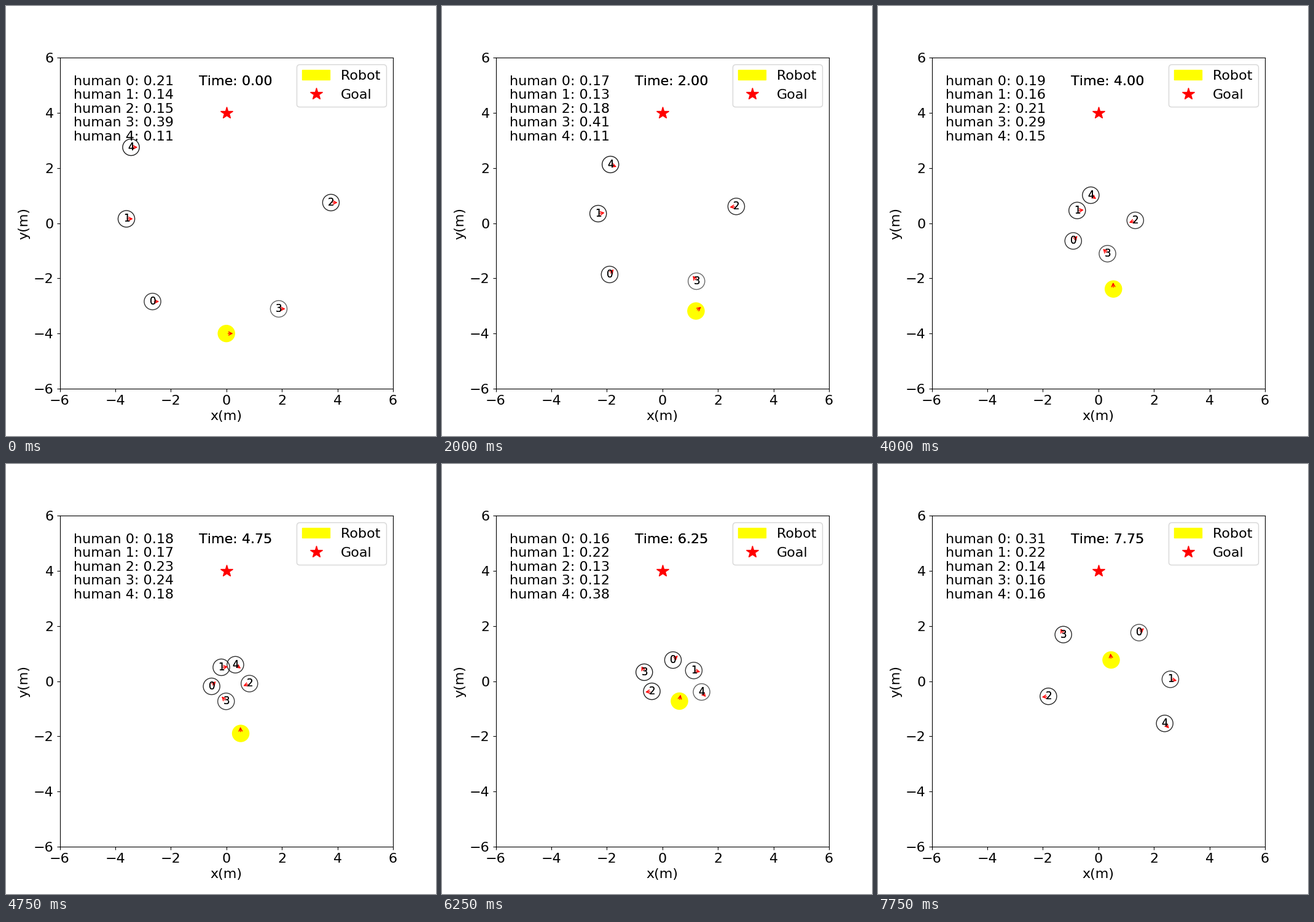
Animation of 700 by 700 pixels, one loop 8 s. Source, as a matplotlib script:

```python
import numpy as np
import matplotlib.pyplot as plt
from matplotlib.animation import FuncAnimation
from matplotlib.lines import Line2D
from matplotlib.patches import ArrowStyle, Circle, FancyArrowPatch

STEP = 0.25
FRAMES = 32
RADIUS = 0.3
LABEL_SHIFT = 0.11

# Everyone walks straight between a few turning points.
HUMAN_TIMES = [0, 2, 5.5, 7.75]
HUMAN_PATHS = [
    [(-2.66, -2.84), (-1.9, -1.86), (-0.16, 0.267), (1.465, 1.759)],
    [(-3.6, 0.156), (-2.313, 0.345), (0.4, 0.545), (2.593, 0.067)],
    [(3.765, 0.746), (2.66, 0.606), (0.33, -0.278), (-1.8, -0.55)],
    [(1.885, -3.106), (1.227, -2.104), (-0.348, -0.358), (-1.262, 1.688)],
    [(-3.434, 2.75), (-1.87, 2.126), (0.923, 0.178), (2.388, -1.532)],
]
ROBOT_TIMES = [0, 0.5, 0.75, 2, 3.75, 5.5, 6.25, 7.75]
ROBOT_PATH = [(0, -4), (0.02, -4.05), (0.25, -3.95), (1.21, -3.184),
              (0.55, -2.55), (0.49, -1.403), (0.614, -0.724), (0.459, 0.768)]


def walk(times, points):
    """Return a function of time that follows the points."""
    xs, ys = zip(*points)
    return lambda t: np.array([np.interp(t, times, xs), np.interp(t, times, ys)])


def attention(offsets):
    """Shares of the robot's attention: near people and those to its right count more."""
    dist = np.hypot(offsets[:, 0], offsets[:, 1])
    weight = np.exp(0.5 * offsets[:, 0] / dist ** 2) / (1 + dist)
    return weight / weight.sum()


def aim(arrow, path, t):
    """Point the arrow along the last step; at rest it points right."""
    pos = path(t)
    dx, dy = pos - path(t - STEP) if t > 0 else (1, 0)
    tip = pos + RADIUS * np.array([dx, dy]) / np.hypot(dx, dy)
    arrow.set_positions(tuple(pos), tuple(tip))


def bold_text(x, y, text, size):
    """Text drawn twice, which darkens its soft edges."""
    return [ax.text(x, y, text, fontsize=size, color="black") for _ in range(2)]


plt.rcParams["font.family"] = "DejaVu Sans"
plt.rcParams["text.kerning_factor"] = 6
fig, ax = plt.subplots(figsize=(7, 7), dpi=100)
ax.tick_params(labelsize=16)
ax.set_xlim(-6, 6)
ax.set_ylim(-6, 6)
ax.set_xlabel("x(m)", fontsize=16)
ax.set_ylabel("y(m)", fontsize=16)

robot = ax.add_artist(Circle((0, -4), RADIUS, color="yellow"))
goal = ax.add_artist(Line2D([0], [4], color="red", marker="*", linestyle="None",
                            markersize=15))
ax.legend([robot, goal], ["Robot", "Goal"], fontsize=16, loc="upper right")

robot_at = walk(ROBOT_TIMES, ROBOT_PATH)
humans_at = [walk(HUMAN_TIMES, path) for path in HUMAN_PATHS]
circles = [ax.add_artist(Circle((0, 0), RADIUS, fill=False)) for _ in humans_at]
numbers = [bold_text(0, 0, str(i), 12) for i in range(len(humans_at))]
scores = [ax.text(-5.5, 5 - 0.5 * i, "", fontsize=16) for i in range(len(humans_at))]
clock = bold_text(-1, 5, "", 16)

style = ArrowStyle("->", head_length=4, head_width=2)
walkers = [robot_at, *humans_at]
arrows = [ax.add_artist(FancyArrowPatch((0, 0), (1, 0), color="red", arrowstyle=style))
          for _ in walkers]


def update(frame):
    t = frame * STEP
    robot.center = tuple(robot_at(t))
    spots = np.array([at(t) for at in humans_at])
    shares = attention(spots - robot_at(t))
    for i, (spot, share) in enumerate(zip(spots, shares)):
        circles[i].center = tuple(spot)
        circles[i].set_edgecolor(f"{share:.3f}")
        scores[i].set_text(f"human {i}: {share:.2f}")
        for label in numbers[i]:
            label.set_position(tuple(spot - LABEL_SHIFT))
    for arrow, path in zip(arrows, walkers):
        aim(arrow, path, t)
    for label in clock:
        label.set_text(f"Time: {t:.2f}")
    return []


anim = FuncAnimation(fig, update, frames=FRAMES, interval=STEP * 1000,
                     init_func=lambda: update(0), repeat=True, repeat_delay=0)
plt.show()
```
